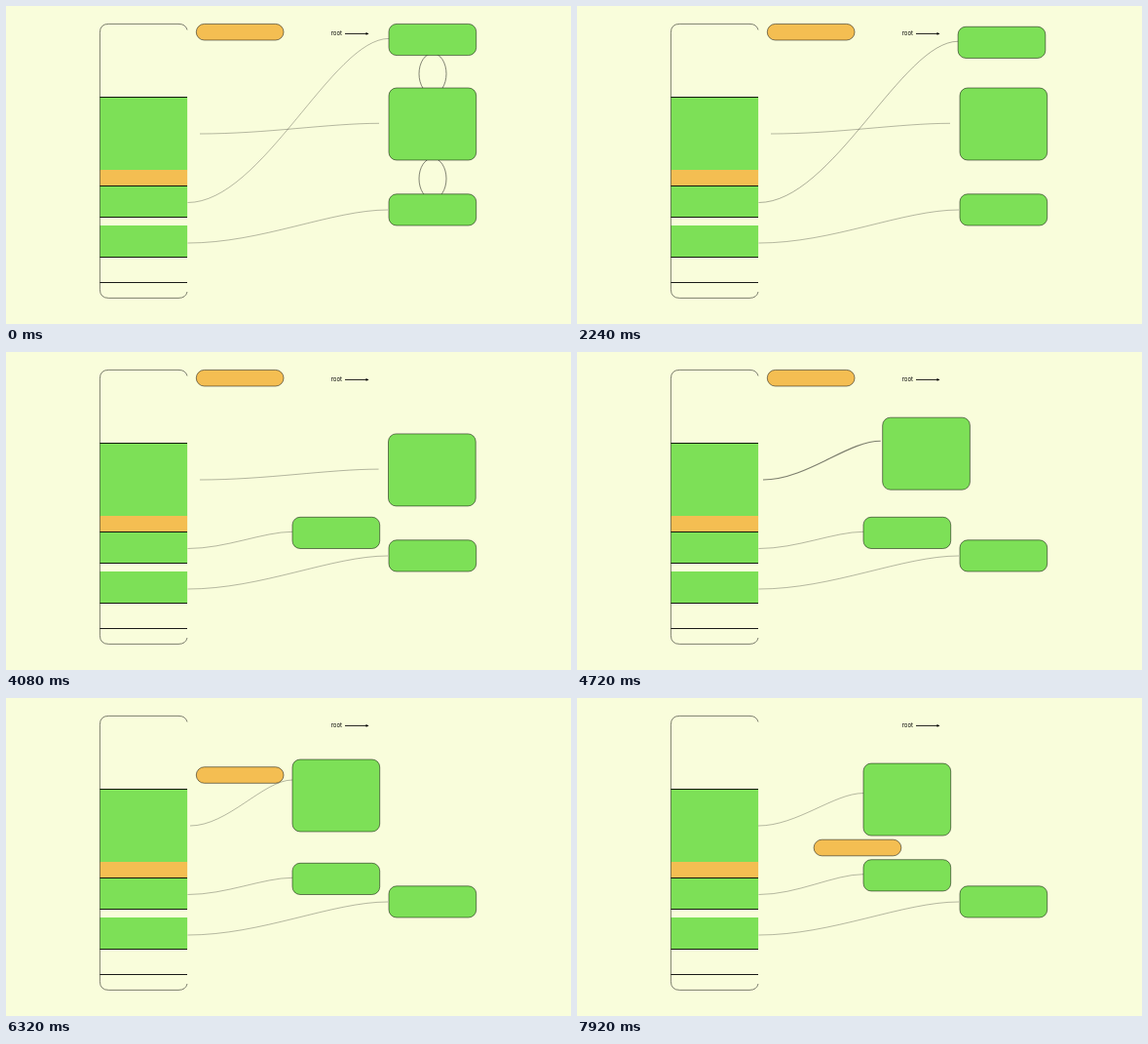
These frames come from a looping animation (580 by 326 pixels, 8000 ms). An HTML page:

```html
<!DOCTYPE html>
<html lang="en">
<head>
<meta charset="utf-8">
<title>Stack and heap blocks</title>
<style>
  html, body { margin: 0; width: 100%; height: 100%; overflow: hidden; background: #f9fddb; }
  svg { display: block; width: 100%; height: 100%; }
  .green { fill: #7de057; }
  .orange { fill: #f4be52; }
  .line { fill: none; stroke: #000; stroke-width: .9; }
  .thin { fill: none; stroke: #000; stroke-width: .5; }
  .box { stroke: #000; stroke-width: .5; }
  .link { fill: none; stroke: #000; stroke-opacity: .5; }
  text { font: 6px Inter, Arial, sans-serif; }
</style>
</head>
<body>
<svg viewBox="0 0 580 326">
  <g>
    <rect class="green" x="96.4" y="93.4" width="89.7" height="75"/>
    <rect class="orange" x="96.4" y="168" width="89.7" height="16.4"/>
    <rect class="green" x="96.4" y="184.4" width="89.7" height="32.1"/>
    <rect class="green" x="96.4" y="225" width="89.7" height="32.5"/>
    <path class="thin" d="M186 24.5Q184.5 18.4 177 18.4H105.4Q96.4 18.4 96.4 27.4V290.4Q96.4 299.4 105.4 299.4H177Q184.5 299.4 186 293"/>
    <path class="line" d="M96.4 93.5H186M96.4 184.5H186M96.4 216.5H186M96.4 257.5H186M96.4 283.5H186"/>
  </g>

  <text x="333.7" y="29.8">root</text>
  <path class="line" d="M348 28.4H371"/>
  <path d="M369.5 27L372.5 28.4L369.5 29.8Z"/>

  <g id="rings" class="thin">
    <ellipse cx="438" cy="69.5" rx="14" ry="21"/>
    <ellipse cx="438" cy="177" rx="14" ry="21"/>
  </g>

  <path id="linkA" class="link"/>
  <path id="linkB" class="link"/>
  <path id="linkC" class="link"/>

  <rect id="boxC" class="box green" x="393" y="192.8" width="89.7" height="32.2" rx="8"/>
  <rect id="boxB" class="box green" width="89.7" height="74" rx="8"/>
  <rect id="boxA" class="box green" width="89.7" height="32.2" rx="8"/>
  <rect id="pill" class="box orange" width="89.7" height="16.6" rx="8.3"/>
</svg>
<script>
const LOOP = 8000, MOVE = 1000;
const $ = id => document.getElementById(id);
const mix = (a, b, p) => a + (b - a) * p;

// cubic-bezier(.42, 0, .58, 1), solved for x by bisection
function ease(x) {
  if (x <= 0) return 0;
  if (x >= 1) return 1;
  let lo = 0, hi = 1, s;
  for (let i = 0; i < 24; i++) {
    s = (lo + hi) / 2;
    const r = 1 - s;
    const bx = 1.26 * r * r * s + 1.74 * r * s * s + s * s * s;
    if (bx < x) lo = s; else hi = s;
  }
  return s * s * (3 - 2 * s);
}

const step = (t, start) => ease((t - start) / MOVE);

function place(id, x, y) {
  $(id).setAttribute('x', x);
  $(id).setAttribute('y', y);
}

// the curve leaves its block more slowly than it arrives
function link(id, x0, y0, x1, y1, swell = 0) {
  const w = x1 - x0;
  $(id).setAttribute('d', `M${x0} ${y0}C${x0 + w * .37} ${y0} ${x1 - w * .28} ${y1} ${x1} ${y1}`);
  $(id).style.strokeWidth = .55 + swell;
}

// lines thicken while they are being reshaped
const bump = p => 4 * p * (1 - p);

function draw(t) {
  const fade = step(t, -120);
  const a = step(t, 2143);
  const b = step(t, 4030);
  const drop = step(t, 5872);
  const join = step(t, 7430);

  $('rings').style.opacity = 1 - fade;

  const ax = mix(393, 294, a);
  const ay = mix(18.4, 169.3, a) - 7.4 * join;
  place('boxA', ax, ay);
  link('linkA', 186.5, 201.5, ax, ay + 15, bump(a));

  place('boxB', mix(393, 294, b), mix(84, 63, b) + 8.4 * join);
  link('linkB',
    mix(mix(199, 189, b), 183, join), 131,
    mix(383, 294, b), mix(120.3, 84, b) + 28 * join, bump(b));

  link('linkC', 186.5, 243, 392, 209);

  place('pill', mix(195.3, 294, join), mix(18.4, 145.2, drop));
}

function tick(now) {
  draw(now % LOOP);
  requestAnimationFrame(tick);
}
draw(0);
requestAnimationFrame(tick);
</script>
</body>
</html>
```
